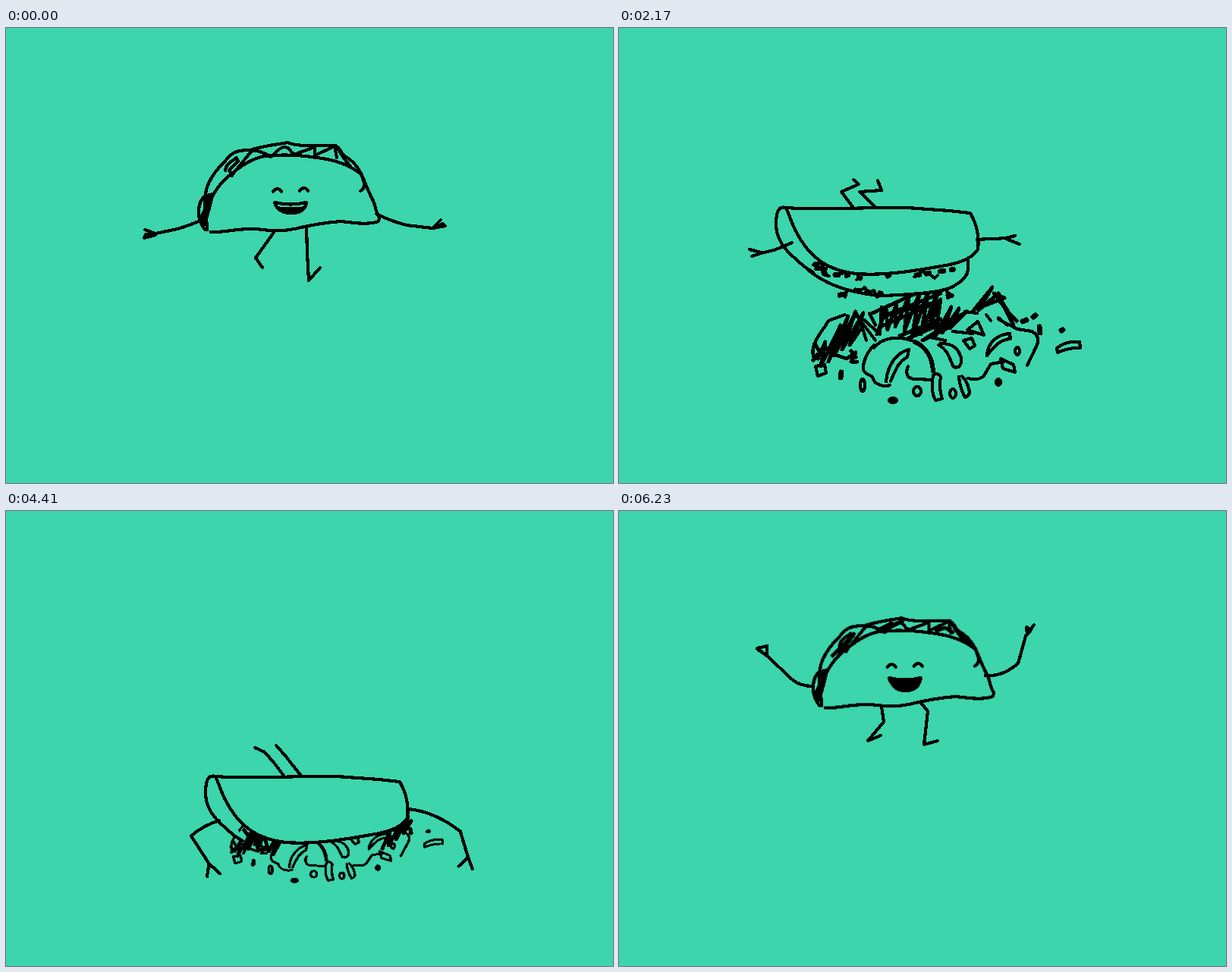
An HTML page without scripts that plays this animation: 800 px wide and 600 px high, repeating every 6300 ms.

```html
<!DOCTYPE html>
<html lang="en">
<head>
<meta charset="utf-8">
<title>Taco</title>
<style>
html, body { margin: 0; width: 100%; height: 100%; overflow: hidden; background: #3cd5ac; }
svg { display: block; width: 100%; height: 100%; }
.ink { fill: none; stroke: #000; stroke-width: 4.2; stroke-linecap: round; stroke-linejoin: round; shape-rendering: crispEdges; }
.skin { fill: #3cd5ac; }
.solid { fill: #000; }

/* 90 ticks of 70 ms; each key steps once per tick */
.ink [class^="a-"] { animation: 6300ms -1ms infinite; }
.a-upright { animation-name: upright, upright-show !important; transform-origin: 381px 262px; }
.a-flipped { animation-name: flipped, flipped-show !important; transform-origin: 340px 237px; }
.a-pile { animation-name: pile, pile-show !important; transform-origin: 400px 425px; }
.a-arms { animation-name: arms !important; }
.a-legs { animation-name: legs !important; }
.a-fresh { animation-name: fresh-show !important; }
.a-crumbs { animation-name: crumbs-show !important; }
.a-pressed { animation-name: pressed-show !important; }
.a-rim { animation-name: rim-show !important; }
.a-filling { animation-name: filling-show !important; }

@keyframes upright-show { 0%, 85.55%, to { opacity: 1; animation-timing-function: step-end } 31.11% { opacity: 0; animation-timing-function: step-end } }
@keyframes flipped-show { 0%, 85.55%, to { opacity: 0; animation-timing-function: step-end } 31.11% { opacity: 1; animation-timing-function: step-end } }
@keyframes pile-show { 0%, 77.77%, to { opacity: 0; animation-timing-function: step-end } 31.11% { opacity: 1; animation-timing-function: step-end } }
@keyframes fresh-show { 0%, to { opacity: 0; animation-timing-function: step-end } 85.55% { opacity: 1; animation-timing-function: step-end } }
@keyframes crumbs-show { 0% { opacity: 1; animation-timing-function: step-end } 55.55%, to { opacity: 0 } }
@keyframes pressed-show { 0%, 72.22%, to { opacity: 0; animation-timing-function: step-end } 55.55% { opacity: 1; animation-timing-function: step-end } }
@keyframes rim-show { 0%, 72.22%, to { opacity: 1; animation-timing-function: step-end } 55.55% { opacity: 0; animation-timing-function: step-end } }
@keyframes filling-show { 0%, to { opacity: 0; animation-timing-function: step-end } 72.22% { opacity: 1; animation-timing-function: step-end } }

@keyframes upright {
  0% { translate: 0 0; rotate: 0deg; scale: 1 1; animation-timing-function: steps(13) }
  14.44% { translate: -27px -44px; rotate: 5.6deg; scale: 1 1; animation-timing-function: steps(9) }
  24.44% { translate: -38.5px -64px; rotate: 2.1deg; scale: 1 1; animation-timing-function: steps(3) }
  27.77% { translate: -40px -84px; rotate: -2deg; scale: 1 1; animation-timing-function: steps(3) }
  31.11% { translate: -40px -75px; rotate: 0deg; scale: 1 .2 }
  85.55% { translate: 38px 110px; rotate: 0deg; scale: 1 .5; animation-timing-function: steps(2) }
  87.77%, 90% { translate: 40px 115px; rotate: 0deg; scale: 1 1; animation-timing-function: steps(4) }
  94.44% { translate: 15px -118px; rotate: 2deg; scale: 1 1; animation-timing-function: steps(4) }
  98.88%, to { translate: 2px -10px; rotate: -.3deg; scale: 1 1; animation-timing-function: step-end }
}
@keyframes flipped {
  0%, 31.11% { translate: -8px -70px; scale: 1 .3; animation-timing-function: steps(3) }
  34.44% { translate: 0 0; scale: 1 1; animation-timing-function: steps(4) }
  38.88%, 43.33% { translate: 2px -5px; scale: 1 1; animation-timing-function: steps(2) }
  45.55%, 46.66% { translate: 6px -11px; scale: 1 1; animation-timing-function: steps(2) }
  48.88%, 53.33% { translate: 15px 35px; scale: 1 1; animation-timing-function: steps(4) }
  57.77%, 58.88% { translate: 37px 70px; scale: 1 1; animation-timing-function: steps(5) }
  64.44%, 83.33% { translate: 56px 113px; scale: 1 1; animation-timing-function: steps(2) }
  85.55%, to { translate: 56px 60px; scale: 1 .4 }
}
@keyframes pile {
  0%, 31.11% { translate: -24px -130px; scale: .5 .4; animation-timing-function: steps(3) }
  34.44% { translate: 0 0; scale: 1 1; animation-timing-function: steps(4) }
  38.88%, 58.88% { translate: 12px 16px; scale: 1.018 1; animation-timing-function: steps(5) }
  64.44%, 65.55% { translate: 17px 16px; scale: 1.018 1; animation-timing-function: steps(10) }
  76.66%, to { translate: 2px 16px; scale: .45 .25 }
}
@keyframes legs {
  0% { d: path("M354 268L342 285L329 303L338 316M396 262L397 297L399 333L414 316"); animation-timing-function: steps(5) }
  5.55% { d: path("M346 250L358 275L352 310L368 306M386 246L380 265L356 285L364 297"); animation-timing-function: steps(5) }
  11.11% { d: path("M333 233L338 252L320 270L328 282M375 229L376 263L378 299L393 284"); animation-timing-function: steps(3) }
  14.44% { d: path("M328 216L349 232L331 257L341 271M373 220L358 244L344 267L359 277"); animation-timing-function: steps(4) }
  18.88% { d: path("M322 213L330 240L328 272L344 268M364 212L366 232L345 250L352 262"); animation-timing-function: steps(5) }
  24.44% { d: path("M312 196L320 217L303 241L308 254M359 199L349 236L332 249L344 256"); animation-timing-function: steps(3) }
  27.77% { d: path("M311 182L316 205L296 222L290 236M356 180L352 212L370 226L385 222"); animation-timing-function: steps(3) }
  31.11% { d: path("M304 168L294 172L312 178L318 190M332 168L318 180L345 184L350 196"); animation-timing-function: steps(3) }
  34.44% { d: path("M309 237L293 216L316 206L309 200M338 236L317 216L346 214L341 201"); animation-timing-function: steps(4) }
  38.88%, 43.33% { d: path("M311 232L296 212L312 202L318 198M340 231L324 212L342 206L350 200"); animation-timing-function: steps(2) }
  45.55%, 46.66% { d: path("M315 226L296 206L318 196L312 190M344 225L328 206L346 200L342 190"); animation-timing-function: steps(2) }
  48.88%, 53.33% { d: path("M324 272L302 246L298 236L290 230M353 271L335 250L325 238L315 228"); animation-timing-function: steps(4) }
  57.77%, 58.88% { d: path("M347 306L334 290L322 274L309 268M370 305L358 290L354 286L338 266"); animation-timing-function: steps(5) }
  64.44%, 83.33% { d: path("M366 349L354 333L341 318L328 312M389 349L376 333L370 325L356 309"); animation-timing-function: steps(2) }
  85.55% { d: path("M382 377L360 390L372 410L384 420M430 372L446 388L436 410L450 420"); animation-timing-function: steps(2) }
  87.77%, 90% { d: path("M392 383L384 412L386 445L400 442M438 377L440 410L440 446L456 444"); animation-timing-function: steps(4) }
  94.44% { d: path("M364 148L366 172L340 185L346 200M413 143L420 165L410 200L424 206"); animation-timing-function: steps(4) }
  98.88%, to { d: path("M346 258L349 278L328 303L345 296M398 253L407 264L402 308L420 303"); animation-timing-function: step-end }
}
@keyframes arms {
  0% { d: path("M256 254Q240 261 226 265L197 271L183 266M182 277L197 273L184 272ZM488 245Q505 254 528 260L562 264L573 253M579 261L562 264L576 258Z"); animation-timing-function: steps(13) }
  14.44% { d: path("M230 203Q212 208 195 212L163 216L151 207M151 220L163 216L151 208ZM461 205Q480 210 500 213L527 216L543 207M550 218L527 216L549 212Z"); animation-timing-function: steps(9) }
  24.44% { d: path("M215 185Q200 184 185 183L158 183L138 187M139 178L158 182L151 177ZM449 180Q470 177 490 177L512 176L529 168M535 178L512 176L524 176Z"); animation-timing-function: steps(3) }
  27.77% { d: path("M213 172Q195 160 180 140L160 118L145 112M148 125L160 118L152 122ZM448 165Q470 150 485 130L505 108L520 100M524 112L505 108L514 110Z"); animation-timing-function: steps(3) }
  31.11% { d: path("M224 185Q205 178 190 165L170 155L156 148M154 160L170 155L162 157ZM464 185Q480 180 495 172L512 165L528 158M530 172L512 165L520 168Z"); animation-timing-function: steps(3) }
  34.44% { d: path("M228 283Q215 289 204 293L187 297L175 301M172 292L187 296L180 294ZM472 279Q485 278 495 278L510 277L522 274M528 285L510 278L518 281Z"); animation-timing-function: steps(4) }
  38.88%, 43.33% { d: path("M230 278Q216 282 206 286L188 290L174 296M173 284L188 290L180 287ZM474 274Q487 274 497 272L513 271L526 265M532 278L513 271L520 274Z"); animation-timing-function: steps(2) }
  45.55%, 46.66% { d: path("M234 272Q220 282 212 290L206 306L204 318M214 316L206 306L210 311ZM478 268Q492 276 502 286L510 302L505 314M520 312L510 302L515 307Z"); animation-timing-function: steps(2) }
  48.88%, 50% { d: path("M243 318Q228 326 218 336L212 352L205 364M218 366L212 352L215 359ZM487 314Q502 322 510 332L516 348L512 360M521 360L516 348L518 354Z"); animation-timing-function: steps(2) }
  52.22%, 53.33% { d: path("M243 318Q222 328 200 346L210 385L200 400M216 402L210 385L213 394ZM487 314Q512 322 526 340L528 380L520 398M532 396L528 380L530 388Z"); animation-timing-function: steps(4) }
  57.77%, 58.88% { d: path("M270 367Q273 380 274 395L275 430L270 450M264 426L270 442L267 434ZM511 349Q522 358 530 365L546 394L552 408M545 402L548 398L547 400Z"); animation-timing-function: steps(5) }
  64.44%, 65.55% { d: path("M281 408Q260 412 245 425L240 455L233 470M246 472L240 455L243 464ZM530 393Q560 398 580 415L600 450L592 464M610 462L600 450L605 456Z"); animation-timing-function: steps(3) }
  68.88% { d: path("M281 408Q258 415 242 430L260 470L275 485M258 488L260 470L259 479ZM530 393Q570 395 605 425L632 460L620 474M638 476L632 460L635 468Z"); animation-timing-function: steps(4) }
  73.33% { d: path("M281 408Q265 414 250 424L290 450L304 458M286 464L290 450L288 457ZM530 393Q550 400 580 415L540 446L526 452M545 460L540 446L542 453Z"); animation-timing-function: steps(3) }
  76.66% { d: path("M281 408Q270 414 260 426L292 458L304 468M286 472L292 458L289 465ZM530 393Q545 398 562 412L536 452L524 462M540 466L536 452L538 459Z"); animation-timing-function: steps(5) }
  82.22%, 83.33% { d: path("M281 408Q270 412 258 421L303 443L313 453M296 455L305 446L300 451ZM530 393Q545 398 564 408L541 436L530 447M545 447L537 434L541 440Z"); animation-timing-function: steps(2) }
  85.55% { d: path("M296 362Q284 356 274 356L270 380L264 392M276 392L270 380L273 386ZM525 355Q545 340 560 320L572 300L585 290M587 302L572 300L580 301Z"); animation-timing-function: steps(2) }
  87.77%, 90% { d: path("M296 369Q280 375 268 385L280 405L288 412M278 416L280 405L279 410ZM528 360Q545 366 558 378L545 400L536 408M548 412L545 400L546 406Z"); animation-timing-function: steps(4) }
  94.44% { d: path("M270 125Q254 125 235 108L208 78L196 68M208 64L208 78L196 67ZM498 110Q515 110 538 92L552 56L562 36M550 40L552 56L558 48Z"); animation-timing-function: steps(4) }
  98.88%, to { d: path("M256 231Q238 231 228 222L195 191L182 182M195 178L195 191L182 181ZM483 217Q505 219 526 201L536 165L547 150M537 153L538 163L543 157Z"); animation-timing-function: step-end }
}
</style>
</head>
<body>
<svg viewBox="0 0 800 600" role="img" aria-label="A dancing taco spills its filling and scoops it back up">
<g class="ink">

  <g class="a-pile">
    <g stroke-width="5">
      <path d="M262 436L272 414L266 446L292 392L276 440L302 380L284 432L312 374L294 424L322 376L304 418L322 392L312 376M258 416L266 430L256 438"/>
      <path d="M340 404L352 370L354 398L366 362L364 394L382 354L376 400L396 350L386 408L408 346L398 404L420 348L408 398L424 358L416 408L438 368L426 402L448 370L436 396L458 374"/>
      <path d="M334 376L400 346L424 350L348 380L424 360L344 394M370 406L424 384L380 410L456 376L400 412L440 392"/>
      <path d="M466 374L492 342L474 372L500 350L482 366L508 356L494 350L514 376L504 360L520 392L512 374L524 386"/>
      <path d="M288 432L300 436L312 428L306 440L314 440M306 426L312 434"/>
    </g>
    <path d="M256 432C252 415 270 398 276 386L298 378M318 386L326 412M320 388L338 412M322 384L344 404L346 368M330 376L338 392M256 434L274 422M410 408L430 412M440 400L466 403M456 374L472 376M484 378L490 386M500 382L512 392"/>
    <path d="M336 418C320 436 320 452 325 455L334 460C336 470 348 474 357 471M336 422C346 408 368 406 386 412M352 466C354 444 366 428 382 424L380 434C368 440 364 452 358 466M381 446C376 458 382 464 394 463L412 464"/>
    <path stroke-width="6" d="M390 414C404 420 413 434 414 452"/>
    <path d="M421 418C434 424 436 438 441 447C450 450 454 440 449 430C444 418 434 416 424 416M414 458q-4 20 3 33l9 -2q-5 -15 -2 -29q-5 -7 -10 -2M448 460q1 14 8 27q8 -2 5 -11q-3 -12 -9 -17"/>
    <path d="M460 462C472 465 480 462 483 455L490 443L508 440M500 384L525 397L544 400C553 405 554 412 550 420L538 445"/>
    <path d="M485 432C486 415 498 404 515 403L516 410C502 411 496 418 485 432M459 398L473 387L481 405ZM454 412l11 -3l4 10l-7 4zM503 436l17 8l2 10l-16 -5zM259 446l12 -2l2 11l-11 4zM577 422Q590 412 607 414L608 422Q594 421 578 428Z"/>
    <g class="solid"><ellipse cx="361" cy="491" rx="5" ry="3"/><ellipse cx="500" cy="467" rx="3" ry="4"/><path d="M293 454l-1 7M554 394l1 8M546 381l3 -2M532 387l5 -2M583 399l2 -1" stroke-width="7"/></g>
    <ellipse cx="393" cy="479" rx="5" ry="6"/><ellipse cx="440" cy="482" rx="4" ry="6"/><ellipse cx="525" cy="426" rx="3" ry="5"/><ellipse cx="321" cy="471" rx="3" ry="8"/>
  </g>

  <g class="a-flipped">
    <g class="a-rim">
      <path class="skin" stroke="none" d="M246 316C290 352 330 354 362 352C420 350 464 342 460 303L360 310L246 300Z"/>
      <path d="M246 316C275 343 320 352 350 353C390 351 425 349 440 341C462 329 461 320 460 303"/>
    </g>
    <path class="skin" d="M220 237C208 234 207 246 207 262C209 284 222 296 246 316L256 322"/>
    <g class="a-pressed" stroke-width="5">
      <path d="M258 308L268 322L272 310L276 332L284 314L290 336L300 318L296 340L306 322M440 332L450 310L448 328L462 304L458 320L474 290L468 312L478 296"/>
    </g>
    <g class="a-crumbs">
      <path stroke-width="7" stroke-dasharray="4 11 2 15" d="M258 312L275 326L300 325L318 330M312 346L345 350M354 327l2 -1M392 326L442 318M291 352l7 -1M434 352l4 1"/>
      <path d="M256 312l10 -3l3 6l-10 3l14 -1l-4 8l8 2M292 324l8 -2l-1 6M313 322l3 7l-3 3M316 348l8 -6l4 8l8 -4l4 9l7 -5M290 354l10 -6l-2 7M389 328l12 -8l4 6M411 326l5 4l4 -4M432 348l8 5l-7 3"/>
    </g>
    <g class="a-filling">
      <path class="solid" d="M219 255L216 268L230 292L248 312L256 304L242 290L236 270L228 260Z"/>
      <path d="M247 313C274 338 300 345 334 345M459 298C462 322 452 334 432 341M262 306l8 14l-10 -2l10 12M330 326q15 3 22 20q-18 0 -22 -20"/>
      <path stroke-width="7" stroke-dasharray="5 10" d="M272 320Q295 328 325 328"/>
      <path d="M386 330C372 322 358 330 358 338C362 350 378 348 386 342M380 336L400 322L392 340L408 320L414 344L424 306L430 330L438 308L444 322L452 306L462 314"/>
    </g>
    <path class="skin" d="M220 237C275 241 310 236 380 237L435 241L463 244C472 260 475 276 473 292C464 306 444 311 425 314C390 320 350 327 312 324C280 320 262 308 247 290C230 268 227 252 220 237Z"/>
  </g>

  <path class="a-legs" d="M354 268L342 285L329 303L338 316M396 262L397 297L399 333L414 316"/>

  <g class="a-upright">
    <path class="skin" stroke="none" d="M264 266C262 200 310 163 371 153C450 155 470 190 491 255Q380 262 270 269Z"/>
    <path d="M270 269C288 270 304 264 330 265C350 268 366 268 380 265C405 259 425 256 442 255C458 257 478 260 491 255L492 250C486 241 488 234 482 224C476 212 472 200 467 190"/>
    <path d="M265 266L264 250C266 226 280 206 295 194C310 182 322 173 340 169C365 166 390 168 410 171C435 174 452 180 467 192"/>
    <path d="M262 266C250 250 252 230 263 220C264 202 278 186 290 174C298 164 304 161 322 161C340 155 356 154 371 151C380 155 394 156 434 155C441 158 441 164 445 168C458 175 466 186 470 198C474 208 472 212 467 215"/>
    <path d="M297 195L309 180L324 162C332 161 340 164 349 170L360 160Q370 152 377 165L382 166L407 157V168L433 156L436 171M438 160L444 170L455 184"/>
    <path d="M289 188C290 178 298 176 304 171L306 176L294 187L298 195"/>
    <path class="solid" d="M262 222L272 219L270 230L265 248L260 262L257 250L262 240Z"/>
    <path d="M352 216q2 -4 6 -4q4 1 5 4M387 215q2 -4 6 -4q4 1 5 4"/>
    <path d="M354 230Q375 235 396 230Q394 244 376 244Q358 244 354 230Z"/>
    <path class="solid" stroke-width="2" d="M357 236Q375 239 394 236Q390 244 376 244Q362 244 357 236Z"/>
    <g class="a-fresh">
      <path stroke-width="5" d="M280 200L302 178L288 200L308 172M340 167L358 158L346 168L372 155M417 168L428 164L438 170M448 174L462 184"/>
      <path class="solid" d="M357 235L395 234Q391 247 376 247Q361 247 357 235Z"/>
    </g>
  </g>

  <path class="a-arms" d="M256 254Q240 261 226 265L197 271L183 266M182 277L197 273L184 272ZM488 245Q505 254 528 260L562 264L573 253M579 261L562 264L576 258Z"/>
</g>
</svg>
</body>
</html>
```
